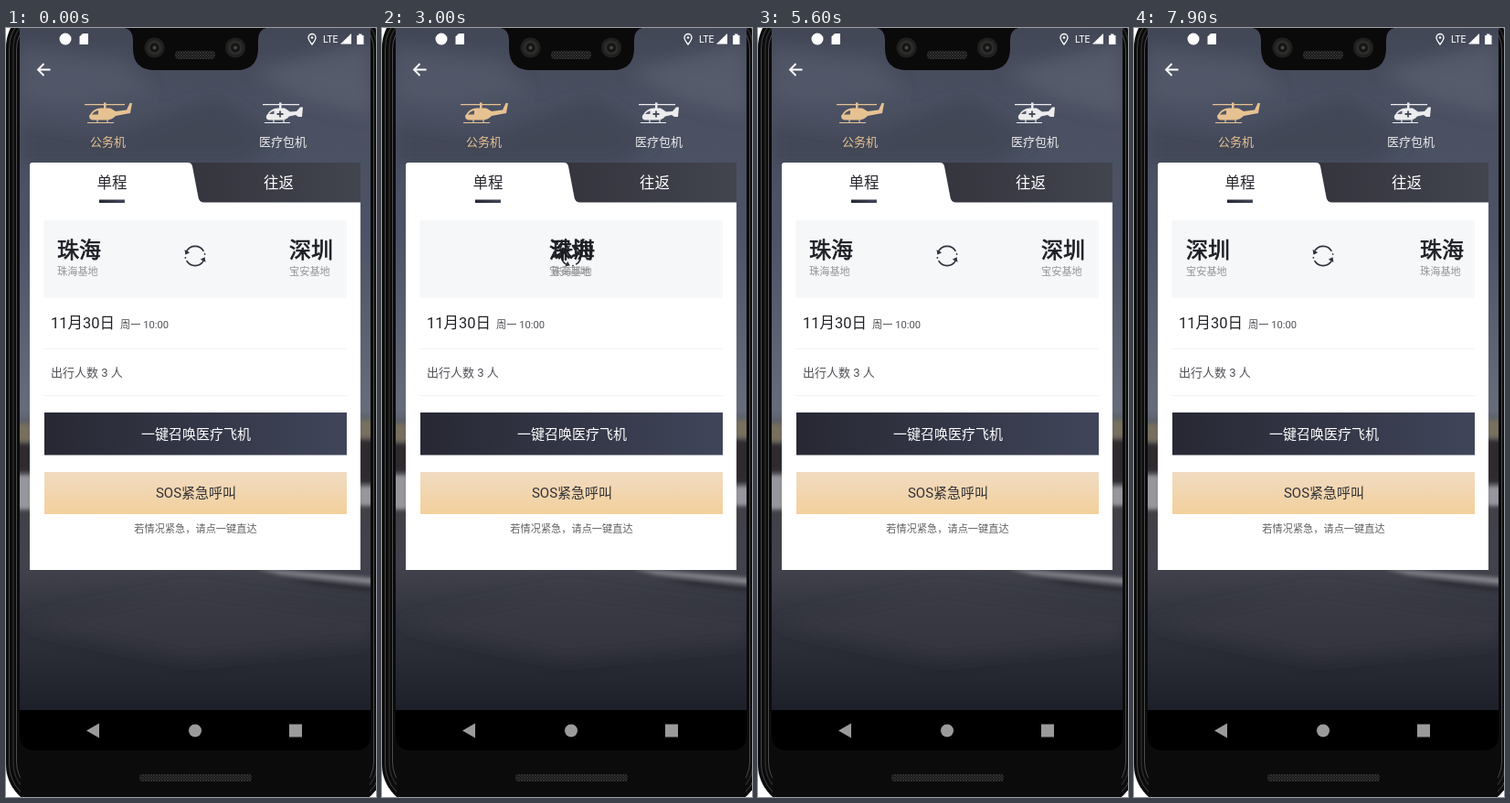
Animation, 405 px wide and 840 px high, one loop 8000 ms. Source, as an HTML page:

```html
<!DOCTYPE html>
<html lang="zh-CN">
<head>
<meta charset="utf-8">
<title>Flight booking</title>
<style>
html, body { margin: 0; width: 100%; height: 100%; overflow: hidden; background: #fff; }
svg { display: block; }
text { font-family: Roboto, "Noto Sans CJK SC", sans-serif; }
.mid { text-anchor: middle; }
.city { font-size: 24px; fill: #1d1e24; stroke: #1d1e24; stroke-width: .7px; }
.base { font-size: 11.2px; fill: #949496; }
</style>
</head>
<body>
<svg width="405" height="840" viewBox="0 0 405 840">
  <defs>
    <linearGradient id="sky" x2="0" y2="1">
      <stop offset="0" stop-color="#424756"/>
      <stop offset=".1" stop-color="#4a5061"/>
      <stop offset=".3" stop-color="#4c5366"/>
      <stop offset=".56" stop-color="#666c7a"/>
      <stop offset=".62" stop-color="#403f44"/>
      <stop offset=".79" stop-color="#41424b"/>
      <stop offset=".86" stop-color="#32343e"/>
      <stop offset="1" stop-color="#1e2029"/>
    </linearGradient>
    <linearGradient id="tab"><stop stop-color="#34353d"/><stop offset="1" stop-color="#42444e"/></linearGradient>
    <linearGradient id="navy"><stop stop-color="#272833"/><stop offset="1" stop-color="#40455a"/></linearGradient>
    <linearGradient id="sand" x2="0" y2="1"><stop stop-color="#f1dbc2"/><stop offset="1" stop-color="#f3d09b"/></linearGradient>
    <filter id="blur" x="-50%" y="-50%" width="200%" height="200%"><feGaussianBlur stdDeviation="9"/></filter>
    <filter id="soft" x="-50%" y="-50%" width="200%" height="200%"><feGaussianBlur stdDeviation="2"/></filter>
    <clipPath id="screen"><path d="M15 0H399V745H15Z"/></clipPath>
    <pattern id="mesh" width="3" height="3" patternUnits="userSpaceOnUse">
      <path d="M0 0H3V3H0Z" fill="#171717"/><path d="M0 0L3 3M3 0L0 3" stroke="#383838" stroke-width=".7"/>
    </pattern>
    <g id="lens"><circle r="11" fill="#20201f"/><circle r="8" fill="#2d2c2b"/><circle r="5" fill="#151516"/><circle r="2" fill="#4a4642"/></g>
    <g id="arc">
      <path d="M-9.3-5.2A10.700 10.700 0 0 1 9.300-5.200" fill="none" stroke="#30323c" stroke-width="1.700"/>
      <path d="M-11.500-6.800L-10.600-1.200L-5.800-3.800Z" fill="#30323c"/>
      <circle cx="10.600" cy="-2" r=".9" fill="#30323c"/>
    </g>
  </defs>

  <!-- phone -->
  <rect width="414" height="876" y="-25" rx="46" fill="#0b0b0c"/>
  <g fill="none">
    <rect x="3.500" y="-21" width="407" height="868" rx="43" stroke="#48484a"/>
    <rect x="8" y="-17" width="398" height="859" rx="39" stroke="#2b2b2d" stroke-width="1.500"/>
    <rect x="11.500" y="-13" width="391" height="851" rx="36" stroke="#4c4c4f"/>
  </g>
  <path d="M16 790H398V840H16Z" fill="#0b0b0c"/>
  <path d="M15 0H399V745H15Z" fill="url(#sky)"/>

  <!-- backdrop -->
  <g clip-path="url(#screen)">
    <g filter="url(#blur)">
      <path d="M15 20L130 35L160 70L60 85L15 75Z" fill="#5b6171" opacity=".5"/>
      <path d="M270 48L399 15V95L330 78Z" fill="#626878" opacity=".5"/>
      <path d="M15 105L110 118L230 75L300 120L260 150H15Z" fill="#3b404f" opacity=".6"/>
      <path d="M15 650L200 612L399 640V670L200 690Z" fill="#3d3e49" opacity=".5"/>
    </g>
    <g filter="url(#soft)">
      <path d="M10 432H28V452H10ZM386 428H405V448H386Z" fill="#77705f"/>
      <path d="M10 454H28V484H10ZM386 450H405V496H386Z" fill="#2d2b2d"/>
      <path d="M10 488H28V526H10ZM386 500H405V522H386Z" fill="#96969d"/>
      <path d="M272 590L405 601V608L300 597Z" fill="#85868d"/>
      <path d="M300 600L405 612V617L340 609Z" fill="#292b33"/>
    </g>
  </g>
  <path d="M15 745H399V772Q399 789 382 789H32Q15 789 15 772Z" fill="#000"/>
  <path d="M130 0Q139 2 139 13V22Q139 46 163 46H252Q276 46 276 22V13Q276 2 285 0Z" fill="#0a0a0b"/>
  <use href="#lens" x="162.500" y="21.500"/>
  <use href="#lens" x="251" y="21.500"/>
  <rect x="185" y="25" width="44" height="9" rx="4" fill="url(#mesh)"/>
  <rect x="146" y="815" width="123" height="8" rx="3" fill="url(#mesh)"/>

  <!-- status and navigation bars -->
  <g fill="#fff">
    <circle cx="65" cy="12" r="6.500"/>
    <path d="M84 6H90V18H80.500V9.500Z"/>
    <path d="M335 6.500A4 4 0 0 0 331 10.500Q331 13 335 18Q339 13 339 10.500A4 4 0 0 0 335 6.500Z" fill="none" stroke="#fff" stroke-width="1.300"/>
    <circle cx="335" cy="10.500" r="1.300"/>
    <text x="347" y="16" font-size="10.500">LTE</text>
    <path d="M378 6V17.500H366Z"/>
    <path d="M384 8H386V6.500H389.500V8H391.500V18H384Z"/>
  </g>
  <path d="M48.500 45.500H35M41.500 39L35 45.500L41.500 52" fill="none" stroke="#fff" stroke-width="1.900"/>
  <g fill="#9b9b9b">
    <path d="M88 767.500L102 759.500V775.500Z"/>
    <circle cx="207" cy="767.500" r="7"/>
    <path d="M310 760.500H324V774.500H310Z"/>
  </g>

  <!-- service types -->
  <g fill="#e6c293">
    <path d="M86 83H130V84.300H86ZM107 81.500H109.500V88H107ZM91 96Q95 88 103 87.500H114L120 91L132 89.500L135.500 82H138L136 93L120 96Q116 100.500 109 100.500H95Q91 100 91 96Z"/>
    <path d="M89 103.500H118M100 100V104M111 100V104" stroke="#e6c293" stroke-width="1.200"/>
    <path d="M94 94.500Q97 90.500 101 90V94.500Z" fill="#555761"/>
    <text class="mid" x="111.500" y="129" font-size="13">公务机</text>
  </g>
  <g fill="#ececee">
    <path d="M281 83H321V84.300H281ZM299 81.500H301.500V88H299ZM285 96Q289 88 297 87.500H305L311 91.500L318 91L322 86.500H325L324 97H320L317 95L310 96.500Q307 100.500 302 100.500H289Q284 100.500 285 96Z"/>
    <path d="M283 103.500H311M293 100V104M304 100V104" stroke="#ececee" stroke-width="1.200"/>
    <path d="M300 90.500V97.500M296.500 94H303.500" stroke="#484c58" stroke-width="1.800"/>
    <path d="M288 94Q290 91 293.500 90.500V94Z" fill="#565b68"/>
    <text class="mid" x="303" y="129" font-size="13">医疗包机</text>
  </g>

  <!-- card -->
  <path d="M26 150Q26 147 29 147H388V592H26Z" fill="#fff"/>
  <path d="M199 147Q203 147 204 151L210.500 185Q211.500 190.500 217 190.500H388V147Z" fill="url(#tab)"/>
  <text class="mid" x="116" y="175" font-size="16.500" fill="#26272d">单程</text>
  <text class="mid" x="298.500" y="175" font-size="16.500" fill="#fff">往返</text>
  <rect x="102" y="187.500" width="28" height="3.500" fill="url(#navy)"/>
  <rect x="41" y="210" width="332" height="85" rx="3" fill="#f6f7f9"/>
  <text x="49" y="328" font-size="16.500" fill="#222329">11月30日</text>
  <text x="125" y="328" font-size="11.200" fill="#515157">周一 10:00</text>
  <text x="49" y="381" font-size="13" fill="#515157">出行人数 3 人</text>
  <path d="M42 350.500H373M42 401.500H373" stroke="#f2f2f3"/>
  <rect x="42" y="420" width="331" height="46.500" fill="url(#navy)"/>
  <text class="mid" x="208" y="449" font-size="15" fill="#fff">一键召唤医疗飞机</text>
  <rect x="42" y="485" width="331" height="46" fill="url(#sand)"/>
  <text class="mid" x="208" y="513" font-size="15" fill="#303036">SOS紧急呼叫</text>
  <text class="mid" x="207.500" y="551" font-size="11.200" fill="#626266">若情况紧急，请点一键直达</text>

  <!-- route -->
  <g id="swap"><use href="#arc"/><use href="#arc" transform="rotate(180)"/></g>
  <g id="zhuhai"><text class="city" y="251">珠海</text><text class="base" y="270">珠海基地</text></g>
  <g id="shenzhen"><text class="city" y="251">深圳</text><text class="base" y="270">宝安基地</text></g>
</svg>
<script>
const LOOP = 8000, TICK = 100, DURATION = 480;
const swapStarts = [1115, 2076, 2760, 3572, 4326, 5115, 5860, 6560, 7215, 7881];
const [swap, zhuhai, shenzhen] = ['swap', 'zhuhai', 'shenzhen'].map(id => document.getElementById(id));

const ease = x => (1 - Math.cos(Math.PI * x)) / 2;
const place = (el, x) => el.setAttribute('transform', `translate(${Math.round(x)} 0)`);

function draw(now) {
  const time = Math.floor(now % LOOP / TICK) * TICK;
  const turns = swapStarts.reduce((sum, start) =>
    sum + ease(Math.min(1, Math.max(0, (time - start) / DURATION))), 0);
  // Even swaps bring the cities back
  const shift = 1 - Math.abs(1 - turns % 2);
  place(zhuhai, 56 + 258 * shift);
  place(shenzhen, 310 - 254 * shift);
  swap.setAttribute('transform', `translate(207 249) rotate(${180 * turns})`);
}

const origin = performance.now();
function frame() {
  draw(performance.now() - origin);
  requestAnimationFrame(frame);
}
frame();
</script>
</body>
</html>
```
